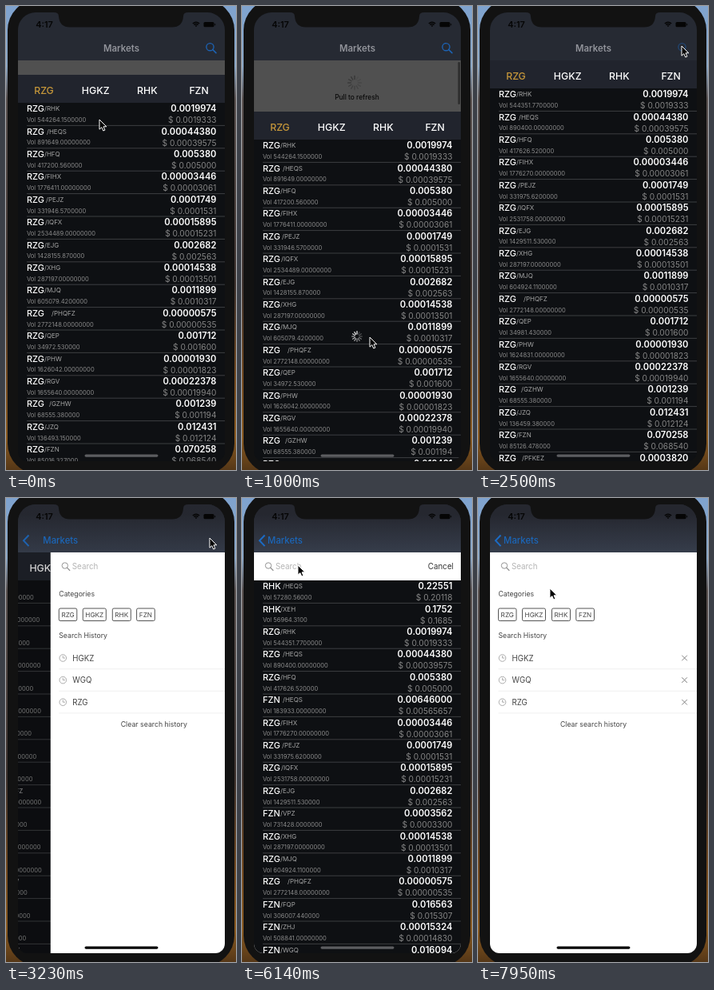
Write an HTML page that moves like this. It is 288x580 px and loops after 8 s.

```html
<!DOCTYPE html>
<html lang="en">
<head>
<meta charset="utf-8">
<title>Markets</title>
<style>
  html, body { margin: 0; width: 100%; height: 100%; overflow: hidden; background: #111; }
  svg { display: block; width: 288px; height: 580px; }
  text { font-family: Inter, Roboto, sans-serif; white-space: pre; }
</style>
</head>
<body>
<svg id="stage" viewBox="0 0 288 580">
  <defs>
    <linearGradient id="wall" x2="0" y2="1">
      <stop offset="0" stop-color="#7fa3cf"/>
      <stop offset=".13" stop-color="#8ba6c4"/>
      <stop offset=".2" stop-color="#5b5250"/>
      <stop offset=".6" stop-color="#3d312d"/>
      <stop offset=".8" stop-color="#73491f"/>
      <stop offset=".93" stop-color="#8a5a20"/>
      <stop offset="1" stop-color="#553717"/>
    </linearGradient>
    <linearGradient id="navShade" x2="0" y2="1">
      <stop offset=".3" stop-color="#25272f"/>
      <stop offset="1" stop-color="#363d4b"/>
    </linearGradient>
    <clipPath id="screen"><path d="M15 30a22 22 0 0 1 22-22H252a22 22 0 0 1 22 22V557a12 12 0 0 1-12 12H27a12 12 0 0 1-12-12Z"/></clipPath>
    <clipPath id="content"><path d="M15 68H274V570H15Z"/></clipPath>
  </defs>
</svg>
<script>
const LOOP = 8000, ROW = 28.4, WIDTH = 259;
const RELOADED = 1500, PUSH_START = 3047, PUSH_TIME = 400;
const SEARCH_OPEN = 5900, SEARCH_CLOSE = 7600;

// base, quote, quote x, price, dollar price, volume, volume after reload
const MARKETS = `
RZG RHK 48 0.0019974 0.0019333 544264.1500000 544351.7700000
RZG HEQS 51 0.00044380 0.00039575 891649.00000000 890400.00000000
RZG HFQ 48 0.005380 0.005000 417200.560000 417626.520000
RZG FIHX 48 0.00003446 0.00003061 1776411.00000000 1776270.00000000
RZG PEJZ 50 0.0001749 0.0001531 331946.5700000 331975.6200000
RZG IQFX 49 0.00015895 0.00015231 2534489.00000000 2531758.00000000
RZG EJG 48 0.002682 0.002563 1428155.870000 1429511.530000
RZG XHG 48 0.00014538 0.00013501 287197.00000000 287197.00000000
RZG MJQ 48 0.0011899 0.0010317 605079.4200000 604924.1100000
RZG PHQFZ 57 0.00000575 0.00000535 2772148.00000000 2772148.00000000
RZG QEP 48 0.001712 0.001600 34972.530000 34981.430000
RZG PHW 48 0.00001930 0.00001823 1626042.00000000 1624831.00000000
RZG RGV 48 0.00022378 0.00019940 1655640.00000000 1655640.00000000
RZG GZHW 54 0.001239 0.001194 68555.380000 68555.380000
RZG JZQ 48 0.012431 0.012124 136493.150000 136459.380000
RZG FZN 48 0.070258 0.068540 85016.327000 85126.478000
RZG PFKEZ 55 0.0003820 0.0003705 51420.7700000 51420.7700000`;
const EXTRAS = `
RHK HEQS 51 0.22551 0.20118 57280.56000 57280.56000
RHK XEH 48 0.1752 0.1685 56964.3100 56964.3100
FZN HEQS 51 0.00646000 0.00565657 183933.00000000 183933.00000000
FZN VPZ 48 0.0003562 0.0003300 731428.0000000 731428.0000000
FZN FQP 48 0.016563 0.015307 306007.440000 306007.440000
FZN ZHJ 48 0.00015324 0.00014830 508841.00000000 508841.00000000
FZN WGQ 48 0.016094 0.015421 41822.370000 41822.370000`;
const parse = table => table.trim().split('\n').map(line => line.split(' '));
const markets = parse(MARKETS), extras = parse(EXTRAS);
const results = [
  ...extras.slice(0, 2), ...markets.slice(0, 3), extras[2],
  ...markets.slice(3, 7), extras[3], ...markets.slice(7, 10), ...extras.slice(4)
];

function el(tag, parent, attrs = {}) {
  const node = document.createElementNS('http://www.w3.org/2000/svg', tag);
  for (const key in attrs) node.setAttribute(key, attrs[key]);
  return parent.appendChild(node);
}
const group = (parent, attrs) => el('g', parent, attrs);
const rect = (parent, x, y, width, height, fill, more) => el('rect', parent, { x, y, width, height, fill, ...more });
const line = (parent, d, stroke, width = 1, more) => el('path', parent, { d, stroke, 'stroke-width': width, fill: 'none', ...more });
const circle = (parent, cx, cy, r, stroke, width = 1) => el('circle', parent, { cx, cy, r, stroke, 'stroke-width': width, fill: 'none' });
// y is the middle of the capital letters
function label(parent, str, x, y, size, fill, anchor = 'start', weight = 400) {
  const node = el('text', parent, {
    x, y: y + size * .364, 'font-size': size, fill, 'text-anchor': anchor, 'font-weight': weight
  });
  node.textContent = str;
  return node;
}
function spinner(parent, x, y, inner, outer, color, width) {
  const wheel = group(parent, { transform: `translate(${x} ${y})` });
  const spokes = Array.from({ length: 12 }, (_, i) =>
    line(wheel, `M0 ${-inner}V${-outer}`, color, width, { transform: `rotate(${i * 30})`, 'stroke-linecap': 'round' }));
  return t => spokes.forEach((spoke, i) => {
    const age = (Math.floor(t / 83) - i + 1200) % 12;
    spoke.setAttribute('opacity', 1 - age * .072);
  });
}
function list(parent, rows) {
  return rows.map(([base, quote, quoteX, price, dollars, before, after], i) => {
    const y = 103 + i * ROW;
    label(parent, base, 26, y + 7.2, 10.9, '#fff', 'start', 500);
    label(parent, '/' + quote, quoteX, y + 7.2, 8, '#a6a6a6');
    label(parent, price, 263.5, y + 7.2, 11.2, '#fff', 'end', 600);
    label(parent, '$ ' + dollars, 263.5, y + 21.5, 10.2, '#858585', 'end');
    line(parent, `M26 ${y + ROW}H274`, '#484a4d', .8);
    return { node: label(parent, 'Vol ' + after, 26, y + 21.3, 7.55, '#8b8b8b'), before, after };
  });
}
const magnifier = (parent, x, y, r, color, width) => {
  const g = group(parent);
  circle(g, x, y, r, color, width);
  line(g, `M${x + r * .72} ${y + r * .72}l${r * .9} ${r * .9}`, color, width * 1.2, { 'stroke-linecap': 'round' });
  return g;
};

const stage = document.getElementById('stage');
rect(stage, 0, 0, 288, 580, 'url(#wall)');
rect(stage, 2, -8, 284, 593, '#121212', { rx: 38 });
const screen = group(stage, { 'clip-path': 'url(#screen)' });
rect(screen, 15, 0, WIDTH, 570, '#0e1013');
const content = group(screen, { 'clip-path': 'url(#content)' });

// Market list with pull to refresh
const home = group(content);
const pullArea = rect(home, 15, 68, WIDTH, 0, '#505050');
const pullHint = group(home);
const turnHint = spinner(pullHint, 141, 32, 4.5, 8.5, '#353535', 1.3);
label(pullHint, 'Pull to refresh', 144, 50, 8.4, '#0a0a0a', 'middle', 500);
const scrollBar = rect(home, 270.5, 70, 2.5, 53, '#2c2c2c', { rx: 1.2 });
const sheet = group(home);
rect(sheet, 15, 68, WIDTH, 35, '#21242d');
rect(sheet, 15, 103, WIDTH, 500, '#0e1013');
['RZG', 'HGKZ', 'RHK', 'FZN'].forEach((name, i) =>
  label(sheet, name, 47.5 + i * 64.7, 88, 12.3, i ? '#fff' : '#c6973a', 'middle', 500));
const volumes = list(sheet, markets);
const shade = rect(home, 15, 68, WIDTH + 80, 510, '#000');

// Search page
const page = group(content);
rect(page, 15, 68, WIDTH, 510, '#fff');
magnifier(page, 33, 84.5, 3.7, '#8a8a8a', .9);
label(page, 'Search', 42, 85.5, 9.8, '#b4b4b4');
const history = group(page);
label(history, 'Categories', 25.5, 120.3, 8.7, '#444');
[['RZG', 25.5, 22.5], ['HGKZ', 55.5, 29], ['RHK', 92.5, 23], ['FZN', 122.8, 22.7]].forEach(([name, x, w]) => {
  rect(history, x, 138, w, 15.5, 'none', { stroke: '#555', rx: 1.8 });
  label(history, name, x + w / 2, 146, 8.2, '#444', 'middle');
});
label(history, 'Search History', 25.5, 172.3, 8.7, '#444');
['HGKZ', 'WGQ', 'RZG'].forEach((name, i) => {
  const y = 200 + i * 27.6;
  circle(history, 30.5, y, 4.3, '#999', .8);
  line(history, `M30.5 ${y - 2.8}V${y}H33.2`, '#999', .8);
  label(history, name, 42.5, y, 9.7, '#444');
  line(history, `M255.3 ${y - 3.3}l6.6 6.6m0-6.6l-6.6 6.6`, '#777', .9);
  line(history, `M25.5 ${y + 13.7}H274`, '#ececec', .8);
});
label(history, 'Clear search history', 144.5, 283, 8.75, '#444', 'middle');
const found = group(page);
rect(found, 15, 103, WIDTH, 500, '#0e1013');
label(found, 'Cancel', 265, 85.5, 9.8, '#333', 'end');
list(found, results);

// Navigation and status bars
rect(screen, 15, 0, WIDTH, 68, '#262a33');
const navShade = rect(screen, 15, 0, WIDTH, 68, 'url(#navShade)');
const title = label(screen, 'Markets', 0, 53, 11.4, '#92949b', 'middle', 600);
const backTitle = label(screen, 'Markets', 0, 53, 11.3, '#1b66b8', 'middle', 500);
const chevron = line(screen, 'M28.5 46.5L22 53.3L28.5 60.1', '#1b6bc4', 2);
const searchButton = magnifier(screen, 255.5, 51.2, 4.6, '#1c62b2', 1.4);
label(screen, '4:17', 48, 23, 10.9, '#050505', 'middle', 600);
[5.6, 3.4].forEach(r => line(screen, `M${238 - r * .75} ${26 - r * .72}Q238 ${26 - r * 1.35} ${238 + r * .75} ${26 - r * .72}`, '#050505', 1.5));
el('path', screen, { d: 'M236.6 24.5Q238 23.3 239.4 24.5L238 26.3Z', fill: '#050505' });
rect(screen, 247.5, 20, 13, 6.3, '#050505', { rx: 1.6 });
rect(screen, 261.2, 22, 1, 2.3, '#050505');
const homeBar = rect(screen, 98.5, 560.4, 92, 3.4, '#000', { rx: 1.7 });
el('path', stage, { d: 'M60 0V8Q66 8 66 13Q67 26.5 80 26.5H208Q221 26.5 222 13Q222 8 228 8V0Z', fill: '#121212' });

const loader = group(stage);
const turnLoader = spinner(loader, 144, 413, 3, 6.3, '#fff', 1.2);
const cursor = el('path', stage, {
  d: 'M0 0V12.2L2.8 9.6L4.8 14L6.9 13.1L5 8.8H8.8Z', fill: '#000', stroke: '#fff', 'stroke-width': 1
});

const cursorPath = [
  [0, 117, 142], [700, 160, 414], [1250, 160, 414], [2250, 255, 50], [3400, 255, 50],
  [4700, 38, 145], [5050, 38, 145], [5750, 70, 84], [6150, 70, 84], [6500, 120, 210],
  [7400, 250, 85], [7620, 250, 85], [7950, 90, 113], [8000, 88, 114]
];
const pullPath = [[0, 18], [650, 108], [780, 108], [990, 64], [1500, 64], [1900, 0], [8000, 0]];

const clamp = v => Math.min(1, Math.max(0, v));
function follow(path, t) {
  const i = Math.max(1, path.findIndex(key => key[0] >= t));
  const [from, to] = [path[i - 1], path[i]];
  const u = clamp((t - from[0]) / (to[0] - from[0])), eased = u * u * (3 - 2 * u);
  return from.slice(1).map((v, k) => v + (to[k + 1] - v) * eased);
}
const move = (node, x, y) => node.setAttribute('transform', `translate(${x} ${y})`);
const fade = (node, opacity) => node.setAttribute('opacity', opacity);

function render(t) {
  const [pull] = follow(pullPath, t);
  const pushed = 1 - (1 - clamp((t - PUSH_START) / PUSH_TIME)) ** 3;
  const searching = t >= SEARCH_OPEN && t < SEARCH_CLOSE;

  move(sheet, 0, pull);
  move(pullHint, 0, pull);
  pullArea.setAttribute('height', pull);
  fade(pullHint, clamp((pull - 20) / 40));
  fade(scrollBar, clamp((pull - 30) / 30));
  volumes.forEach(({ node, before, after }) => { node.textContent = 'Vol ' + (t < RELOADED ? before : after); });
  turnHint(t);
  turnLoader(t);
  fade(loader, t >= 800 && t < RELOADED ? 1 : 0);

  move(home, -pushed * WIDTH * .3, 0);
  fade(shade, pushed * .2);
  move(page, (1 - pushed) * WIDTH, 0);
  fade(history, searching ? 0 : 1);
  fade(found, searching ? 1 : 0);

  const titleX = 144.5 - pushed * 90.5;
  title.setAttribute('x', titleX);
  backTitle.setAttribute('x', titleX);
  fade(title, 1 - clamp(pushed * 1.5));
  fade(backTitle, clamp(pushed * 1.5));
  fade(chevron, pushed);
  fade(navShade, pushed);
  fade(searchButton, (t > 2400 ? .5 : 1) * (1 - clamp(pushed * 1.5)));
  homeBar.setAttribute('fill', pushed > .4 && !searching ? '#000' : '#5c5d60');

  move(cursor, ...follow(cursorPath, t));
}

const start = performance.now();
function tick() {
  render((performance.now() - start) % LOOP);
  requestAnimationFrame(tick);
}
tick();
</script>
</body>
</html>
```
